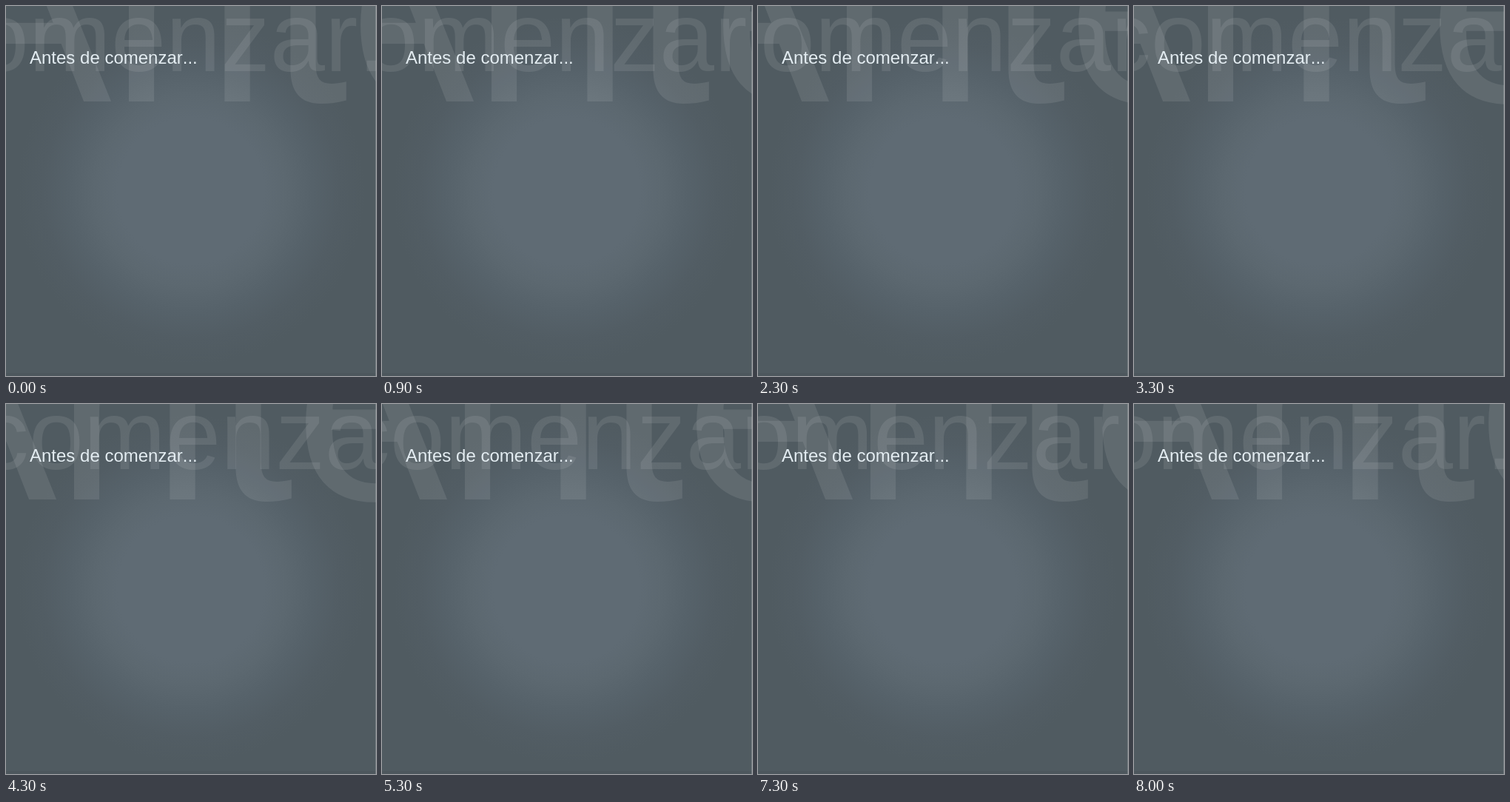
Recreate the animation shown at these times as an HTML page. Size 500 px wide and 500 px high, loop 8.1 s.

```html
<!DOCTYPE html>
<html lang="es">
<head>
<meta charset="utf-8">
<title>Antes de comenzar...</title>
<style>
  html, body { margin: 0; width: 100%; height: 100%; overflow: hidden; background: #505b61; }
  svg { display: block; width: 100%; height: 100%; }
  text { font-family: "Liberation Sans", Arial, sans-serif; font-kerning: none; }
</style>
</head>
<body>
<svg viewBox="0 0 500 500">
  <defs>
    <radialGradient id="glow" gradientUnits="userSpaceOnUse" cx="250" cy="250" r="235">
      <stop offset=".42" stop-color="#5f6b74"/>
      <stop offset=".55" stop-color="#5c6870"/>
      <stop offset=".7" stop-color="#56626a"/>
      <stop offset=".85" stop-color="#525d64"/>
      <stop offset="1" stop-color="#505b61"/>
    </radialGradient>
  </defs>
  <rect width="500" height="500" fill="url(#glow)"/>
  <rect y="496" width="500" height="4" fill="#000" opacity=".04"/>
  <text id="big" y="129" font-size="388" fill="#fff" opacity=".09">A<tspan dx="-3.7">ntes</tspan></text>
  <text id="mid" y="88" font-size="133.33" fill="#fff" opacity=".09">comenzar...</text>
  <rect x="499" width="1" height="500" fill="#fff" opacity=".2"/>
  <text x="32" y="78" font-size="24" fill="#e3ecf1">Antes de comenzar...</text>
</svg>
<script>
  const STEP = 100, STEPS = 81, HALF = 40, SPEED = 2;
  const big = document.getElementById('big');
  const mid = document.getElementById('mid');
  const start = performance.now();

  // The two backdrop words drift apart, then return.
  function draw(now) {
    const step = Math.floor(Math.max(0, now - start) / STEP) % STEPS;
    const shift = SPEED * (HALF - Math.abs(HALF - step));
    big.setAttribute('transform', `translate(${-116 - shift} 0)`);
    mid.setAttribute('transform', `translate(${-110 + shift} 0)`);
    requestAnimationFrame(draw);
  }
  draw(start);
</script>
</body>
</html>
```
